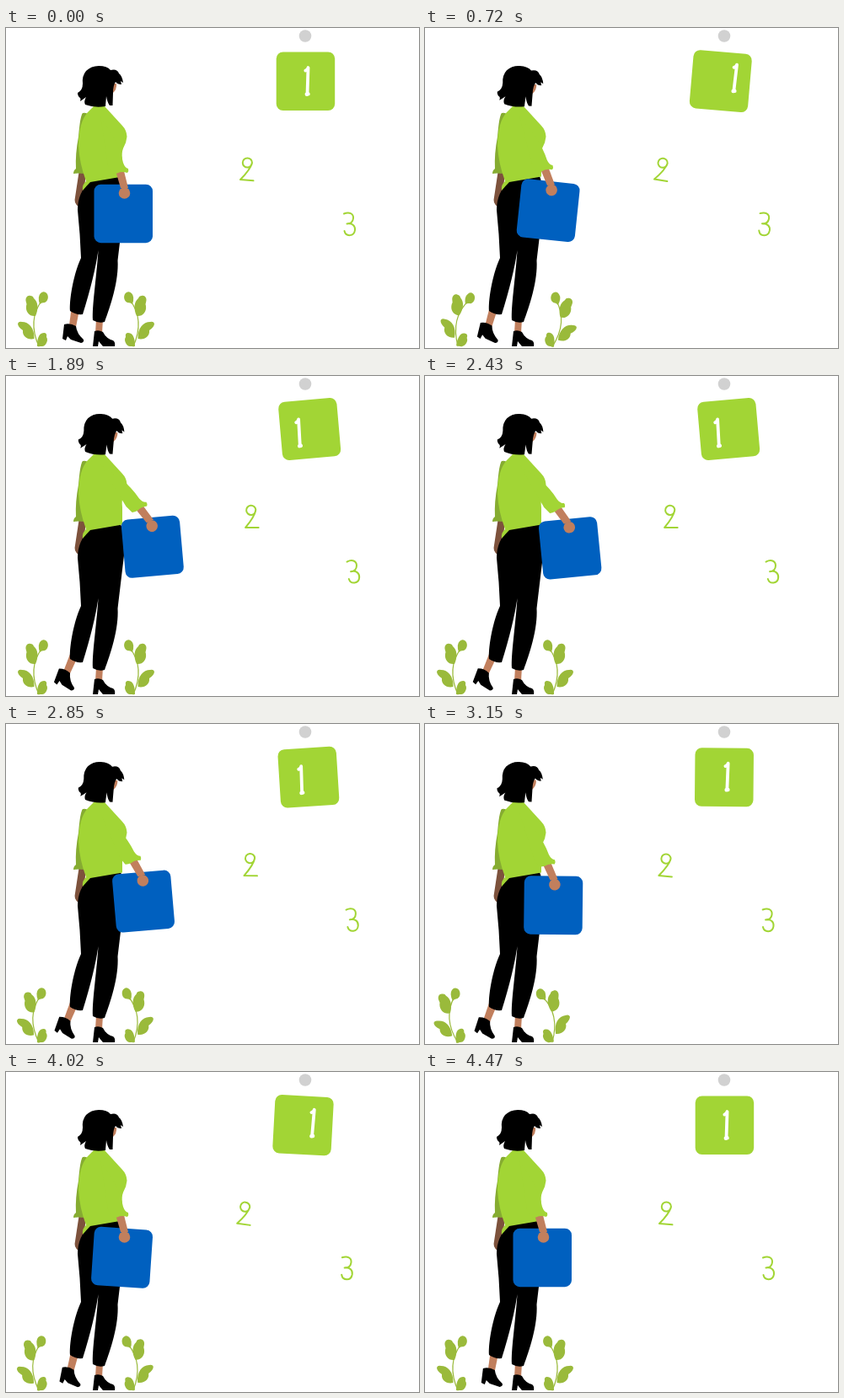
These frames come from a looping animation (490x380 px, 4530 ms). An HTML page with a canvas:

```html
<!DOCTYPE html>
<html lang="en">
<head>
<meta charset="utf-8">
<title>Woman with a blue card</title>
<style>
  html, body { margin: 0; width: 100%; height: 100%; overflow: hidden; background: #fff; }
  canvas { display: block; width: 490px; height: 380px; }
</style>
</head>
<body>
<canvas id="stage" width="490" height="380"></canvas>
<script>
const ctx = document.getElementById("stage").getContext("2d");
const LOOP = 4530, REST = 4500;
const GREEN = "#a2d535", SHADE = "#86ac31", LEAF = "#9aba3b", BLUE = "#0060bf";
const SKIN = "#c17f5d", DARK_SKIN = "#7d523c", BLACK = "#000";

// Eased interpolation through [time, value] keys.
function track(t, ...keys) {
  for (let i = 1; i < keys.length; i++) {
    const [t0, a] = keys[i - 1], [t1, b] = keys[i];
    if (t <= t1) return a + (b - a) * (1 - Math.cos(Math.PI * (t - t0) / (t1 - t0))) / 2;
  }
  return keys[keys.length - 1][1];
}

function pivot(x, y, degrees, draw) {
  ctx.save();
  ctx.translate(x, y);
  ctx.rotate(degrees * Math.PI / 180);
  ctx.translate(-x, -y);
  draw();
  ctx.restore();
}

function fill(path, color) {
  ctx.fillStyle = color;
  ctx.fill(new Path2D(path));
}

function stroke(path, color, width) {
  ctx.strokeStyle = color;
  ctx.lineWidth = width;
  ctx.lineCap = ctx.lineJoin = "round";
  ctx.stroke(new Path2D(path));
}

function disc(x, y, r, color) {
  ctx.fillStyle = color;
  ctx.beginPath();
  ctx.arc(x, y, r, 0, 2 * Math.PI);
  ctx.fill();
}

function card(x, y, color) {
  ctx.fillStyle = color;
  ctx.beginPath();
  ctx.roundRect(x, y, 69.5, 69.5, 8);
  ctx.fill();
}

function plant(angle) {
  pivot(42, 378, angle, () => {
    stroke("M39 378C31 360 30 340 43 323", LEAF, 1.2);
    fill("M40 328Q37 319 41 315Q44 312 47 314C51 316 51 324 46 326Q42 326 40 328Z", LEAF);
    fill("M35 342C28 343 23 337 24 330Q25 328 24 326C22 320 26 317 29 318Q32 318 33 321C38 325 39 333 35 342Z", LEAF);
    fill("M33.500 369C26 371 19 366 20 359Q14 355 14 351Q15 348 19 349C27 349 34 356 33.500 369Z", LEAF);
    fill("M37 378C37 371 38 362 45 362Q49 362 48 367Q50 370 48 374Q46 378 43 378Z", LEAF);
  });
}

function plants(angle) {
  plant(angle);
  ctx.save();
  ctx.translate(190, 0);
  ctx.scale(-1, 1);
  plant(-angle);
  ctx.restore();
}

function legs(footAngle) {
  pivot(85, 324, footAngle, () => {
    fill("M78 330L88 330L83 355L75 353Z", SKIN);
    fill("M69 352Q76 350 83 354Q84 363 92 370Q93 373 89 374L77 370L73 366L71 371L67 369Z", BLACK);
  });
  fill("M107 345H115L114 363H106Z", SKIN);
  fill("M105 360Q110 358 115 361Q119 369 127 371Q130 373 129 378H115L110 372L109 378H103Z", BLACK);
  fill("M100 182L136 176Q140 185 140 213L132.500 276C134 300 124 330 117 349Q110 351 103 347C102 330 107 300 109.500 264Q105 295 91 340Q83 341 76 336C75 325 79 295 89 273Q88 245 85 216Q85 195 100 182Z", BLACK);
}

function backArm() {
  fill("M87 168H95L92 205Q91 212 86 212Q80 208 82 201Z", DARK_SKIN);
  fill("M91 101Q96 100 97 103L93 173Q85 172 80 173Q80 169 83 167Q82 150 86 129Q88 104 91 101Z", SHADE);
}

function torso() {
  fill("M104 93H117L138 116Q143 121 143.500 129Q143 136 139 143Q137 148 138 156V176.500L100 183Q96 187 91 193Q90 186 95 182Q87 160 86 140Q86 112 97 100Z", GREEN);
}

function head(angle) {
  pivot(112, 92, angle, () => {
    fill("M124 66H131Q132 73 126 78Z", SKIN);
    fill("M94 91Q92 87 95 82Q91 85 88 87Q89 84 88 83Q85 81 85 77Q91 74 91 66Q90 57 95 51Q101 45 110 45Q120 45 124 50Q132 48 134 54Q138 57 139 65L136 63L137 67Q132 67 130 64Q127 68 127 77L126.500 92H123Q120 88 119 81L118 93Q105 95 94 91Z", BLACK);
  });
}

function arm(armAngle, boxAngle) {
  pivot(112, 105, -armAngle, () => {
    // The box keeps its own tilt while it hangs from the hand.
    pivot(140, 195, armAngle + boxAngle, () => card(104.5, 185.700, BLUE));
    fill("M129 166L139 166L145 190H136Z", SKIN);
    disc(140.5, 196, 6.8, SKIN);
    fill("M112 105L128 130Q136 145 139 160Q141 166 145 167Q146 170 144 172Q137 170 132 172.500Q128 173 125 172L121 163Z", GREEN);
  });
}

function board(angle) {
  disc(355, 9.500, 7.300, "#d1d1d1");
  pivot(355, 9, angle, () => card(320.700, 28.500, GREEN));
  pivot(281, 110, angle, () => {
    stroke("M292 160A5.600 5.600 0 1 0 286.400 165.600Q291 165.500 292 160Q290 168 278 180L293.500 181.300", GREEN, 2);
  });
  pivot(404, 180, angle, () => {
    stroke("M355.300 50.500Q358 49.500 358.500 47L357.500 78", "#fff", 3.800);
    stroke("M356.800 78.700L358.500 78.400", "#fff", 4.500);
    stroke("M401 220.500C407 218 412.500 220 412 226C411.500 231 408 232.500 404.500 232.500C411 231.500 414.500 235 414 240C413 248 403 248 401.500 241", GREEN, 2);
  });
}

function draw(t) {
  const swing = track(t, [0, 0], [850, 5.2], [1900, -5], [2600, -5], [3650, 5.2], [REST, 0]);
  const box = track(t, [0, 0], [900, 6.6], [1900, -5], [2700, -5.8], [3600, 7], [REST, 0]);
  const reach = track(t, [0, 0], [2080, 23], [3930, 0]);
  const breeze = track(t, [0, 0], [950, 10.5], [1890, 0], [2600, 0], [3400, -10.5], [4320, 0]);
  const nod = track(t, [0, 0], [900, 3], [2700, 3], [3700, 0]);
  const foot = 14 * Math.sin(Math.PI * Math.min(t, REST) / REST);

  ctx.fillStyle = "#fff";
  ctx.fillRect(0, 0, 490, 380);
  board(swing);
  plants(breeze);
  backArm();
  legs(foot);
  torso();
  head(nod);
  arm(reach, box);
}

const start = performance.now();
function tick() {
  draw((performance.now() - start) % LOOP);
  requestAnimationFrame(tick);
}
tick();
</script>
</body>
</html>
```
